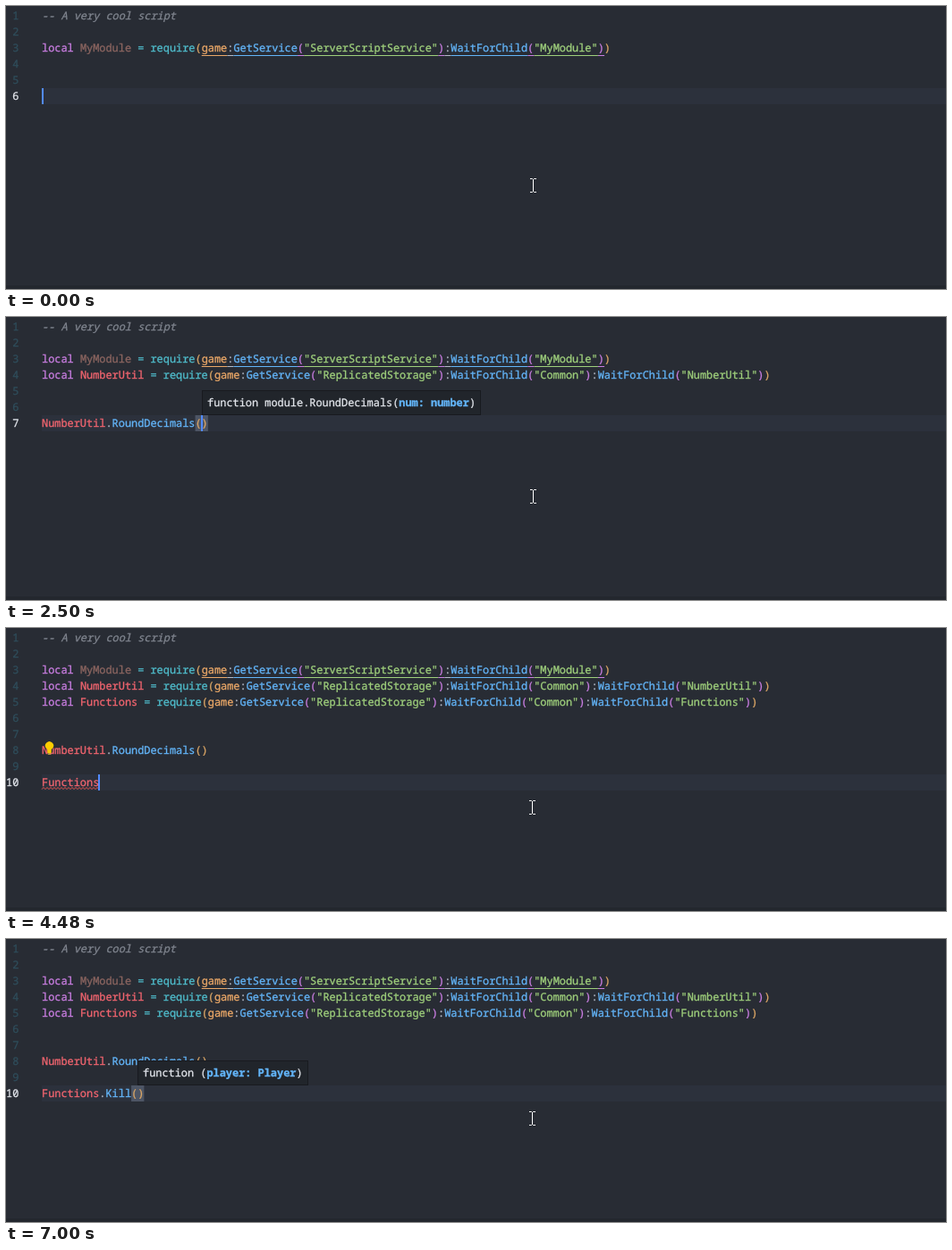
Write an HTML page that moves like this. It is 1051x317 px and loops after 7450 ms.

```html
<!DOCTYPE html>
<html lang="en">
<head>
<meta charset="utf-8">
<title>Auto-require editor demo</title>
<style>
  html, body { margin: 0; width: 100%; height: 100%; overflow: hidden; background: #282c34; }
  svg { display: block; width: 1051px; height: 317px; }
  text {
    font: 11.915px "Noto Sans Mono", "DejaVu Sans Mono", monospace;
    stroke-width: .3px;
    white-space: pre;
    text-rendering: geometricPrecision;
  }
</style>
</head>
<body>
<svg id="stage" viewBox="0 0 1051 317"></svg>
<script>
const LOOP = 7450, LEFT = 40, CHAR = 7.149, LINE = 18, LIST_W = 431, PANEL_W = 332;
const C = {
  fg: '#b4bbc8', dim: '#7f848e', bright: '#e2e5eb', white: '#ffffff',
  red: '#f2656f', unused: '#8b6560', purple: '#ca7ee2', cyan: '#4fbccb', blue: '#63b5f9',
  green: '#9fd07c', orange: '#dca766', gold: '#eba868', yellow: '#e9c67e',
  bg: '#282c34', row: '#2c313c', popup: '#21252b', border: '#181a1f', gutter: '#2f4d5b'
};

// Geometry helpers
const top_ = row => 2 + LINE * (row - 1);
const colX = col => LEFT + CHAR * col;
const rect = (x, y, w, h, fill, more = '') =>
  `<rect x="${x}" y="${y}" width="${w}" height="${h}" fill="${fill}" ${more}/>`;
const path = (d, stroke, more = '') => `<path d="${d}" fill="none" stroke="${stroke}" ${more}/>`;
const box = (x, y, w, h) =>
  rect(x + .5, y + .5, w - 1, h - 1, C.popup, `stroke="${C.border}"`);

// A token is [string, colour, extra attributes]
const text = (x, y, tokens, more = '') => `<text x="${x}" y="${y}" ${more}>` +
  tokens.map(([s, ink = C.fg, attr = '']) =>
    `<tspan fill="${ink}" stroke="${ink}" ${attr}>${s}</tspan>`).join('') + '</text>';
const code = (row, tokens) => text(LEFT, top_(row) + 13, tokens);

const call = (method, arg) =>
  [[':'], [method, C.blue], ['(', C.purple], [`"${arg}"`, C.green], [')', C.purple]];
const importLine = (name, ink, service, ...path) => [
  ['local ', C.purple], [name, ink], [' = ', C.cyan], ['require', C.cyan], ['(', C.orange],
  ['game', C.gold], ...call('GetService', service),
  ...path.flatMap(p => call('WaitForChild', p)), [')', C.orange]
];
const localModule = importLine('MyModule', C.unused, 'ServerScriptService', 'MyModule');
const imports = ['NumberUtil', 'Functions']
  .map(name => importLine(name, C.red, 'ReplicatedStorage', 'Common', name));

function statement(str, ink) {
  const [, word, dot, method, brackets] = str.match(/^(\w*)(\.?)(\w*)(.*)$/);
  return [[word, ink], [dot], [method, C.blue], [brackets, C.orange]];
}

function linkUnderline(row, tokens) {
  let col = 0, out = '';
  tokens.forEach(([s, ink = C.fg], i) => {
    if (i > 4 && i < tokens.length - 1)
      out += rect(colX(col), top_(row) + 17, s.length * CHAR, 1, ink);
    col += s.length;
  });
  return out;
}

function squiggle(row, length, color) {
  const y = top_(row) + 16.7, end = colX(length);
  let d = `M${LEFT} ${y}`;
  for (let x = LEFT + 2, up = true; x < end; x += 2, up = !up) d += `L${x} ${up ? y - 2.2 : y}`;
  return path(d, color);
}

// Completion icons, centred on the given point
const icons = {
  module: (x, y, c) => text(x - 7.2, y + 4, [['{}', c]]),
  struct: (x, y) => path(`M${x - 4} ${y - 3.5}h-2.5v7h2.5M${x + 4} ${y - 3.5}h2.5v7h-2.5
    M${x - 3} ${y}l3 -2.5l3 .5v2l-3 2.5l-3 -1zM${x - 3} ${y}l3 .5l3 -2.5`, C.blue, 'stroke-width="1.2"'),
  snippet: (x, y) => path(`M${x - 6.5} ${y - 5.5}h13v11h-13z`, C.fg, 'stroke-width="1.1"') +
    path(`M${x - 6} ${y + 5.5}h12`, C.popup, 'stroke-dasharray="1 2" stroke-width="2"'),
  method: (x, y, c) => path(`M${x} ${y - 6}l6 3v6l-6 3l-6 -3v-6z
    M${x - 6} ${y - 3}l6 3l6 -3M${x} ${y}v6`, c, 'stroke-width="1.2" stroke-linejoin="round"')
};

// Letters matching the typed prefix, in order, are bold
function matched(label, prefix, ink) {
  let k = 0;
  return [...label].map(ch => prefix[k] && ch.toLowerCase() === prefix[k].toLowerCase()
    ? (k++, [ch, C.white, 'font-weight="700"']) : [ch, ink]);
}

function completionList(x, y, items, prefix) {
  let out = box(x, y, LIST_W + 1, items.length * LINE + 4);
  items.forEach(([kind, label, params = ''], i) => {
    const ink = i ? C.fg : C.bright, rowY = y + 1 + i * LINE;
    if (!i) out += rect(x + 1, rowY, LIST_W - 1, LINE, C.row);
    const iconInk = kind === 'method' && i ? C.blue : C.bright;
    out += icons[kind](x + 11, rowY + 9, iconInk) +
      text(x + 23, rowY + 13, [...matched(label, prefix, ink), [params, C.dim]]);
  });
  return out;
}

function detailPanel(x, y, { title, body, height }, sash) {
  const cx = x + PANEL_W - 12, cy = y + 14;
  return box(x, y, PANEL_W, height) +
    text(x + 6, y + 18, [[title, C.dim]]) +
    path(`M${cx - 4} ${cy - 4}l8 8m0 -8l-8 8`, C.fg) +
    (body ? text(x + 6, y + 52, body) : '') +
    (sash ? rect(x, y + height - 4, PANEL_W - 2, 4, '#3e4454') : '');
}

function signature(x, y, [before, param]) {
  const w = Math.round((before.length + param.length + 1) * CHAR) + 12;
  return rect(x + .5, y + .5, w - 1, 27, C.popup, `stroke="${C.border}"`) +
    text(x + 6, y + 18, [[before, C.bright], [param, C.blue, 'font-weight="700"'], [')', C.bright]]);
}

const bulb = row => {
  const y = top_(row);
  return `<path d="M46.5 ${y + 9.5}q0 -1.5 -1.5 -2.7a4.6 4.6 0 1 1 7 0q-1.5 1.2 -1.5 2.7z" fill="#fc0"/>` +
    rect(46.3, y + 9, 4.4, 3, '#fc0') + rect(46.8, y + 12.3, 3.4, 1.5, '#d8b640');
};

const pointers = {
  ibeam: x => path(`M${x - 3} 193.5h2.5l1 1l1 -1h2.5M${x + .5} 194v14M${x - 3} 208.5h2.5l1 -1l1 1h2.5`, '#fff'),
  resize: () => '<path d="M586.5 190l4 5h-3v11h3l-4 5l-4 -5h3v-11h-3z" fill="#fff" stroke="#111" stroke-width=".7"/>',
  arrow: () => '<path d="M587 200.5v16l3.7 -3.5l2.6 5.8l2.4 -1.1l-2.6 -5.6h5z" fill="#fff" stroke="#000" stroke-width=".8"/>'
};

// Completion contents
const struct = (...names) => names.map(n => ['struct', n]);
const numbers = [['module', 'NumberUtil'], ...struct('NumberRange', 'NumberSequence', 'NumberSequenceKeypoint')];
const functions = [['module', 'Functions'], ['snippet', 'function ()'], ...struct('FloatCurveKey')];
const allN = [...numbers, ...struct('next', 'nil', 'not', 'newproxy')];
const allF = [...functions, ...struct('false', 'for', 'Faces', 'Font', 'FloatCurve')];
const requirePanel = name => ({ title: `Require and use the ${name} module`, height: 38 });
const signatureBody = (prefix, name, type) => [
  ['function', C.purple], [` ${prefix}(`], [name, '#e8836f', 'font-style="italic"'],
  [': '], [type, C.yellow], [')']
];
const roundPanel = { title: 'function', body: signatureBody('module.RoundDecimals', 'num', 'number'), height: 91 };
const killPanel = { title: 'function', body: signatureBody('', 'player', 'Player'), height: 62 };
const closed = { list: null, panel: null, sash: false, pointer: 'ibeam' };
const squiggleRed = '#e0524f';

// Each step changes only the listed parts of the state
const steps = [
  [0, { text: '', ink: C.red, imports: 0, down: 0, caret: true, inside: 0, warn: null, bulb: 0, sig: null, mouseX: 589, ...closed }],
  [20, { text: 'N', ink: '#b9535f' }],
  [90, { list: allN }],
  [150, { panel: requirePanel('NumberUtil') }],
  [230, { warn: squiggleRed }],
  [310, { text: 'Nu', list: numbers }],
  [550, { bulb: 5 }],
  [600, { text: 'Num', bulb: 0 }],
  [860, { bulb: 5 }],
  [1100, { text: 'NumberUtil', ...closed }],
  [1160, { imports: 1 }],
  [1250, { ink: C.red }],
  [1490, { text: 'NumberUtil.', bulb: 0 }],
  [1610, { list: [['method', 'RoundDecimals', '(num)']] }],
  [1770, { panel: { title: 'function', height: 38 } }],
  [1840, { panel: roundPanel, pointer: 'arrow' }],
  [2250, { text: 'NumberUtil.RoundDecimals', ...closed }],
  [2340, { text: 'NumberUtil.RoundDecimals()', inside: 1 }],
  [2420, { warn: null }],
  [2500, { sig: ['function module.RoundDecimals(', 'num: number'] }],
  [2920, { inside: 0 }],
  [3010, { sig: null }],
  [3220, { text: '', down: 1 }],
  [3550, { down: 2, mouseX: 588 }],
  [3630, { text: 'F', ink: C.unused }],
  [3700, { list: allF }],
  [3760, { panel: requirePanel('Functions'), pointer: 'resize' }],
  [3820, { warn: '#77656a' }],
  [4000, { text: 'Fu', list: functions }],
  [4120, { sash: true }],
  [4260, { bulb: 8 }],
  [4440, { text: 'Functions', ink: C.red, warn: squiggleRed, ...closed }],
  [4480, { imports: 2 }],
  [4720, { text: 'Functions.', bulb: 0 }],
  [4780, { list: [['method', 'Kill'], ['method', 'PrintHello']] }],
  [4840, { panel: killPanel, pointer: 'arrow' }],
  [5290, { caret: false }],
  [5520, { text: 'Functions.Kill', caret: true, ...closed }],
  [6100, { caret: false }],
  [6510, { text: 'Functions.Kill()', inside: 1, caret: true }],
  [6570, { warn: null }],
  [6630, { sig: ['function (', 'player: Player'] }],
  [7000, { caret: false }]
];
let current = {};
const states = steps.map(([, change]) => current = { ...current, ...change });

function draw(s) {
  const row = 6 + s.imports + s.down, y = top_(row), col = s.text.length - s.inside;
  const anchor = Math.round(colX(col)), below = y + LINE;
  let out = rect(0, 0, 1051, 317, C.bg) + rect(0, 313, 1051, 4, '#23272e') +
    rect(LEFT, y, 1051 - LEFT, LINE, C.row);

  for (let n = 1; n <= row; n++)
    out += text(14.3, top_(n) + 13, [[n, n === row ? C.bright : C.gutter]], 'text-anchor="end"');

  out += code(1, [['-- A very cool script', C.dim, 'font-style="italic"']]) +
    code(3, localModule) + linkUnderline(3, localModule);
  imports.slice(0, s.imports).forEach((line, i) => out += code(4 + i, line));
  if (s.down) out += code(6 + s.imports, statement('NumberUtil.RoundDecimals()', C.red));

  if (s.text.endsWith(')'))
    out += rect(colX(s.text.length - 2), y, 2 * CHAR, LINE, '#4d5565');
  out += code(row, statement(s.text, s.ink));
  if (s.warn) out += squiggle(row, s.text.split('.')[0].length, s.warn);
  if (s.bulb) out += bulb(s.bulb);
  if (s.caret) out += rect(Math.max(LEFT, anchor - 1), y, 2, LINE, '#528bff');

  if (s.list) out += completionList(anchor, below, s.list, s.text.includes('.') ? '' : s.text);
  if (s.panel) out += detailPanel(anchor + LIST_W, below, s.panel, s.sash);
  if (s.sig) out += signature(anchor, y - 28, s.sig);
  return out + pointers[s.pointer](s.mouseX);
}

const stage = document.getElementById('stage');
const start = performance.now();
let shown = -1;
function tick() {
  const t = (performance.now() - start) % LOOP;
  const index = steps.findLastIndex(([time]) => time <= t);
  if (index !== shown) stage.innerHTML = draw(states[shown = index]);
  requestAnimationFrame(tick);
}
tick();
</script>
</body>
</html>
```
